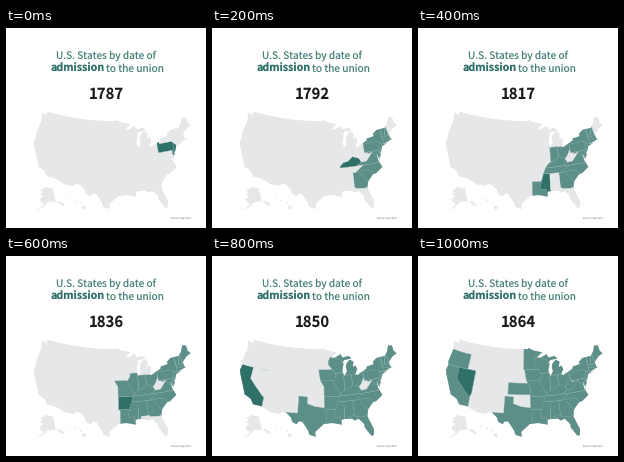
A matplotlib script that plays this animation: 200 by 200 pixels, repeating every 1.2 s.

```python
import matplotlib.pyplot as plt
import numpy as np
from matplotlib.animation import FuncAnimation
from matplotlib.patches import PathPatch
from matplotlib.path import Path

SIZE, DPI = 200, 100
PX = 72 / DPI
SCALE, ORIGIN = 217, (106.2, 132.2)
YEARS = [1787, 1792, 1817, 1836, 1850, 1864]

LAND, ADMITTED, NEWEST, BORDER = "#e5e7e9", "#5c8f88", "#2f7068", "#8bb0aa"
TEAL, SOFT_TEAL, INK, CREDIT = "#2f7068", "#4a827b", "#1c1c1c", "#b4b4b4"

plt.rcParams["font.family"] = "Noto Sans CJK JP"
plt.rcParams["text.hinting"] = "none"


def albers(meridian, center, parallels, scale=1.0, shift=(0, 0)):
    """Return a conic equal-area projection from (lon, lat) to stage pixels."""
    s1, s2 = np.sin(np.radians(parallels))
    n = (s1 + s2) / 2
    c = 1 + s1 * s2

    def raw(lon, lat):
        rho = np.sqrt(c - 2 * n * np.sin(np.radians(lat))) / n
        theta = n * np.radians(lon - meridian)
        return rho * np.sin(theta), rho * np.cos(theta)

    x0, y0 = raw(*center)

    def project(lon, lat):
        x, y = raw(lon, lat)
        return (ORIGIN[0] + SCALE * (scale * (x - x0) + shift[0]),
                ORIGIN[1] + SCALE * (scale * (y - y0) + shift[1]))

    return project


mainland = albers(-96, (-96.6, 38.7), (29.5, 45.5))
alaska = albers(-154, (-156, 58.5), (55, 65), 0.35, (-0.307, 0.201))
hawaii = albers(-157, (-160, 19.9), (8, 18), 1, (-0.205, 0.212))


def outline(points, project=mainland, steps=6):
    """Closed path whose edges follow straight lines in lon/lat."""
    pts = np.array(points, float)
    t = np.arange(steps)[None, :, None] / steps
    dense = pts[:, None] * (1 - t) + np.roll(pts, -1, axis=0)[:, None] * t
    lon, lat = dense.reshape(-1, 2).T
    return Path(np.column_stack(project(lon, lat)))


fig = plt.figure(figsize=(SIZE / DPI, SIZE / DPI), dpi=DPI, facecolor="white")
ax = fig.add_axes([0, 0, 1, 1])
ax.set(xlim=(0, SIZE), ylim=(SIZE, 0))
ax.axis("off")

# Key points of the shoreline, counter-clockwise from Puget Sound
west = [(-122.8, 49), (-122.4, 47.3), (-122.7, 48.1), (-124.7, 48.4),
        (-124, 46.2), (-124.5, 42.8), (-124.1, 41.8), (-124.4, 40.4),
        (-123.8, 39.3), (-121.9, 36.6), (-120.6, 34.5), (-118.4, 33.8),
        (-117.2, 32.5)]
south = [(-114.8, 32.5), (-111.1, 31.3), (-108.2, 31.3), (-108.2, 31.8),
         (-106.5, 31.8), (-104.9, 30.6), (-104.5, 29.6), (-103.1, 29),
         (-102.4, 29.8), (-101.4, 29.8), (-99.5, 27.5), (-99.1, 26.4),
         (-97.2, 25.9), (-97.4, 27.2), (-94.8, 29.3), (-92.3, 29.5),
         (-89.4, 28.95), (-89.4, 30.3), (-86.3, 30.4), (-85.3, 29.7),
         (-84.2, 30.1), (-82.7, 28.5), (-82.7, 27.6), (-81.1, 25.1),
         (-80.4, 25.2)]
east = [(-80.05, 26.8), (-81.4, 30.4), (-80.8, 32.2), (-78.9, 33.8),
        (-77.9, 33.9), (-76.4, 34.7), (-75.5, 35.2), (-76.4, 37.2),
        (-76.5, 39.2), (-75.9, 37.2), (-75.1, 38.6), (-75.5, 39.5),
        (-74.9, 39), (-74, 40.5), (-72, 41), (-73.6, 40.95),
        (-71.5, 41.4), (-69.95, 41.7), (-70.6, 41.95), (-70.6, 43.2),
        (-68.8, 44.3), (-67, 44.8), (-67.8, 45.7), (-67.8, 47.1),
        (-69.2, 47.45), (-70.3, 45.9), (-71.5, 45)]
north = [(-74.7, 45), (-76.3, 44.2), (-76.2, 43.55), (-79, 43.27),
         (-78.9, 42.85), (-82.7, 41.45), (-83.45, 41.75), (-82.4, 43),
         (-82.9, 44.05), (-83.9, 43.7), (-83.4, 45.1), (-84.8, 45.75),
         (-86.2, 44.7), (-86.5, 43.8), (-86.2, 42.8), (-87.2, 41.65),
         (-87.8, 42.5), (-87.9, 43.2), (-87.1, 45.1), (-88, 44.55),
         (-86.9, 45.75), (-84, 46), (-85, 46.75), (-87.4, 46.5),
         (-88, 47.45), (-90.4, 46.55), (-92, 46.7), (-89.6, 48),
         (-93, 48.6), (-95.15, 49.35), (-95.15, 49)]
nation = outline(west + south + east + north)


def land(path):
    ax.add_patch(PathPatch(path, fc=LAND, ec="none"))


def island(lon, lat, radius):
    angle = np.radians(np.arange(0, 360, 45))
    land(outline(np.column_stack([lon + radius * np.cos(angle),
                                  lat + radius * np.sin(angle)]), hawaii))


land(nation)
land(outline([(-141, 69.6), (-141, 60.3), (-137.5, 59), (-135.5, 59.6),
              (-130.1, 56), (-130.5, 54.9), (-133, 55), (-139.5, 59.5),
              (-148, 60), (-151.5, 59.3), (-150.5, 61.2), (-153.8, 59.2),
              (-160, 55.6), (-168.5, 52.9), (-162, 55.8), (-157.2, 58.8),
              (-162, 58.7), (-165.5, 61.5), (-161, 64.3), (-168, 65.6),
              (-162, 66.3), (-166.5, 68.3), (-156.6, 71.3)], alaska))
island(-155.5, 19.6, 0.55)
island(-156.3, 20.8, 0.25)
island(-158, 21.45, 0.25)
island(-159.5, 22, 0.2)

states = []


def state(admitted, *points):
    """Lay a rough state over earlier ones, trimmed by the shoreline.

    Each shared border is given only by the state on top.
    """
    patch = PathPatch(outline(points), lw=0.4 * PX, joinstyle="round")
    ax.add_patch(patch)
    patch.set_clip_path(nation, ax.transData)
    states.append((admitted, patch))


def box(admitted, w, e, s, n):
    state(admitted, (w, n), (e, n), (e, s), (w, s))


# West and plains
box(1850, -125, -114.4, 32, 42)         # California
state(1864, (-120, 42), (-114.04, 42), (-114.04, 36), (-114.6, 35),
      (-120, 39))                       # Nevada
state(1859, (-125, 46.2), (-123, 46.1), (-119, 45.95), (-116.9, 46),
      (-117, 42), (-125, 42))           # Oregon
box(1845, -106.6, -93.8, 25, 36.5)      # Texas
box(1912, -109, -103.05, 32, 37)        # New Mexico
state(1907, (-103, 37), (-94.6, 37), (-94.45, 33.6), (-97.5, 33.9),
      (-100, 34.6), (-100, 36.5), (-103, 36.5))  # Oklahoma
box(1861, -102.05, -94.6, 37, 40)       # Kansas

# Great Lakes and Mississippi valley
box(1803, -84.8, -80.52, 38.3, 42.3)    # Ohio
box(1858, -96.8, -89, 43.5, 49.5)       # Minnesota
box(1837, -90.4, -82, 41.73, 47.6)      # Michigan
box(1818, -91.5, -87.55, 36.9, 42.5)    # Illinois
box(1816, -87.55, -84.8, 37.7, 41.76)   # Indiana
state(1848, (-92.9, 45.6), (-92.2, 46.7), (-90.8, 47.1), (-90.4, 46.57),
      (-88.1, 45.9), (-87.6, 45.1), (-86.9, 45.3), (-87.2, 42.5),
      (-90.6, 42.5), (-92.8, 44.8))     # Wisconsin
state(1846, (-96.5, 43.5), (-91.2, 43.5), (-90.2, 41.8), (-91.4, 40.5),
      (-95.8, 40.6))                    # Iowa
box(1836, -94.5, -89.7, 33, 36.5)       # Arkansas
state(1821, (-95.8, 40.6), (-91.5, 40.6), (-90.2, 38.7), (-89.2, 37),
      (-89.6, 36), (-90.3, 36.5), (-94.6, 36.5), (-94.6, 39.1))  # Missouri

# South
box(1812, -94, -88.8, 28.5, 33)         # Louisiana
state(1817, (-90.3, 35), (-88.2, 35), (-88.4, 30), (-89.6, 30), (-89.7, 31),
      (-91.6, 31), (-91.1, 33))         # Mississippi
box(1789, -84.3, -75, 33.7, 36.55)      # North Carolina
box(1788, -85.4, -80.8, 30.3, 35)       # Georgia
box(1819, -88.3, -85.3, 30, 35)         # Alabama
state(1788, (-83.3, 34.8), (-82.3, 35.2), (-79.7, 34.8), (-78.5, 33.8),
      (-79, 32), (-81, 32), (-81.5, 33))  # South Carolina
state(1845, (-87.6, 31), (-85, 31), (-84.9, 30.7), (-82.1, 30.5), (-81, 30.8),
      (-79, 27), (-80, 24.5), (-87.6, 29))  # Florida
box(1788, -79.48, -75, 37.9, 39.72)     # Maryland
state(1788, (-83.7, 36.55), (-75.7, 36.55), (-75.9, 37.9), (-77, 38.3),
      (-78, 39.4), (-82.5, 38))         # Virginia
state(1796, (-90.3, 35), (-84.3, 35), (-81.7, 36.6), (-89.5, 36.5))  # Tennessee
state(1792, (-89.4, 36.5), (-83.7, 36.6), (-82, 37.5), (-82.6, 38.4),
      (-84.8, 39.1), (-86.5, 38), (-88, 37.8), (-89.1, 37))  # Kentucky
state(1863, (-80.6, 40.6), (-80.5, 39.72), (-79.5, 39.2), (-78, 39.5),
      (-80.3, 37.5), (-82, 37.4), (-82.6, 38.4), (-81.8, 39))  # West Virginia

# Northeast
box(1787, -80.52, -74.6, 39.72, 42.4)   # Pennsylvania
state(1787, (-74.7, 41.36), (-73.9, 41), (-73.8, 39.5), (-74.8, 38.7),
      (-75.5, 39.6), (-74.75, 40.2), (-75.2, 40.7))  # New Jersey
box(1787, -75.75, -75, 38.45, 39.8)     # Delaware
state(1788, (-79.76, 42), (-75.35, 42), (-74, 41), (-73.9, 40.4), (-71.7, 41),
      (-73.4, 41.1), (-73.4, 45.05), (-79.76, 45.05))  # New York
box(1788, -73.4, -69.5, 41.2, 42.8)     # Massachusetts
box(1788, -73.5, -71.8, 41.15, 42.03)   # Connecticut
box(1790, -71.8, -71.2, 41.2, 42.02)    # Rhode Island
state(1791, (-73.4, 45.05), (-71.5, 45.05), (-72.5, 42.73), (-73.3, 42.73))  # Vermont
state(1788, (-71.1, 45.4), (-70.6, 42.87), (-72.5, 42.73), (-71.5, 45))  # New Hampshire
state(1820, (-71.1, 45.4), (-70.8, 43), (-66.5, 44.5), (-67.5, 48), (-70, 48))  # Maine


def label(x, y, text, size, color=TEAL, ha="center", weight="normal"):
    return ax.text(x, y, text, fontsize=size * PX, color=color, ha=ha,
                   va="baseline", weight=weight)


label(100, 31, "U.S. States by date of", 10.1, SOFT_TEAL)
label(44.5, 44, "admission", 10.7, ha="left", weight="bold")
label(158, 44, "to the union", 10.2, SOFT_TEAL, ha="right")
label(185, 190, "source: map data", 2.6, CREDIT, ha="right")
year_text = label(100, 71, "", 14.9, INK, weight="bold")


def shade(admitted, year):
    """Fill and border colours of a state in a given year."""
    if admitted > year:
        return LAND, LAND
    return (NEWEST if admitted == year else ADMITTED), BORDER


def update(frame):
    year = YEARS[frame]
    year_text.set_text(str(year))
    for admitted, patch in states:
        fill, edge = shade(admitted, year)
        patch.set_facecolor(fill)
        patch.set_edgecolor(edge)


animation = FuncAnimation(fig, update, frames=len(YEARS), interval=1200 // len(YEARS),
                          repeat=True, repeat_delay=0)
plt.show()
```
